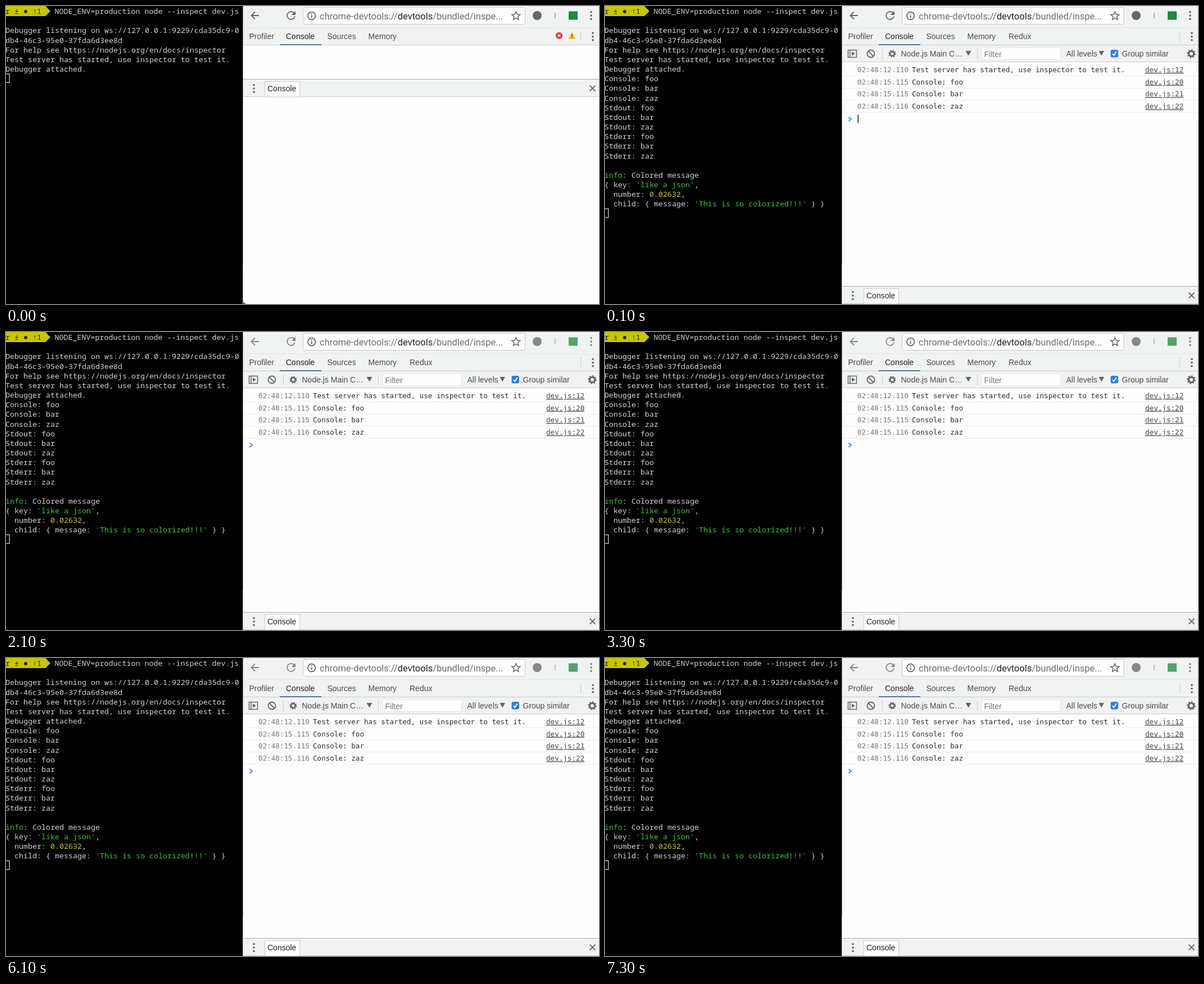
These frames come from a looping animation (1055x531 px, 8100 ms). An HTML page:

```html
<!DOCTYPE html>
<html lang="en">
<head>
<meta charset="utf-8">
<title>Node inspector console</title>
<style>
  html, body { margin: 0; width: 100%; height: 100%; overflow: hidden; background: #fdfefd; }
  svg { display: block; width: 1055px; height: 531px; }
  text { white-space: pre; }
  .term { font: 13.33px "Noto Sans Mono", "DejaVu Sans Mono", monospace; fill: #d2d2d2; }
  .ui { font: 14px "Liberation Sans", Arial, sans-serif; fill: #4a4c4b; }
  .log { font: 12.6px "DejaVu Sans Mono", monospace; fill: #2c2e2d; }
  .url { font: 16.5px Roboto, sans-serif; fill: #6c6e6d; }
  .dark { fill: #222; }
  .dim { fill: #757776; }
  .green { fill: #35c437; }
  .yellow { fill: #cbc72b; }
  .link { fill: #444; text-decoration: underline; }
  .bar { fill: #f1f3f2; }
  .rule { stroke: #c9cccb; }
  .line { fill: none; stroke: #626463; stroke-width: 1.8; }
  .blur .nav { opacity: .76; }
</style>
</head>
<body>
<svg id="stage" viewBox="0 0 1055 531">
  <defs>
    <linearGradient id="red" x1="0" y1="216" x2="0" y2="262" gradientUnits="userSpaceOnUse">
      <stop offset="0" stop-color="#ff2a1c"/>
      <stop offset=".46" stop-color="#fb1710"/>
      <stop offset=".54" stop-color="#e50a06"/>
      <stop offset="1" stop-color="#d90604"/>
    </linearGradient>
    <g id="dots" fill="#5f6160">
      <circle cy="-6.3" r="1.8"/><circle r="1.8"/><circle cy="6.3" r="1.8"/>
    </g>
    <g id="gear" fill="none">
      <circle r="4.6" stroke-width="3"/>
      <circle r="6.6" stroke-width="2.4" pathLength="16" stroke-dasharray="1"/>
    </g>
  </defs>

  <rect width="1055" height="531" fill="#fdfefd"/>

  <!-- terminal -->
  <rect width="421.5" height="531" fill="#000"/>
  <path d="M421.5 461V531" stroke="#b5b7b6"/>
  <path d="M422 524V531H429Q422 531 422 524Z" fill="#444"/>
  <path d="M0 0H70L79 9.3L70 18H0Z" fill="#c9c400"/>
  <g class="term">
    <g fill="#26260a">
      <text x="-1" y="14">r ±</text>
      <circle cx="35" cy="10" r="3"/>
      <text x="47" y="14">↑1</text>
    </g>
    <g id="intro"></g>
    <g id="output"></g>
  </g>
  <rect id="cursor" x="-2.5" width="8.6" height="15.4" fill="none" stroke="#d2d2d2" stroke-width="1.3"/>

  <!-- address bar -->
  <rect class="bar" x="422" width="633" height="69"/>
  <path d="M422 38.5H1055" stroke="#e3e6e4"/>
  <rect x="528.5" y="2.5" width="395" height="30" rx="3" fill="#fdfefd" stroke="#c5c8c6"/>
  <g class="nav">
    <path class="line" d="M450 17H437M443 10.5L436.5 17L443 23.5"/>
    <path class="line" d="M512.4 12.2A7 7 0 1 0 514 18.4"/>
    <path d="M515 9V16H508Z" fill="#626463"/>
    <circle cx="945" cy="17" r="8" fill="#666867"/>
    <rect x="1001" y="9.5" width="16" height="15" fill="#218a41"/>
    <path d="M977 12V22" stroke="#8f9190" stroke-width="1.3"/>
    <use href="#dots" x="1041" y="17"/>
  </g>
  <circle class="line" cx="543.7" cy="17.5" r="6.8" stroke-width="1.5"/>
  <path class="line" d="M543.7 16.5V21.5M543.7 13.2V15"/>
  <path class="line" style="stroke-width:1.5" d="M907.3 10L909.4 15L914.7 15.4L910.7 18.9L911.9 24.1L907.3 21.3L902.7 24.1L903.9 18.9L899.9 15.4L905.2 15Z"/>
  <text class="url" x="558" y="23.5">chrome-devtools://<tspan class="dark">devtools</tspan>/bundled/inspe...</text>

  <!-- panel tabs -->
  <g class="ui">
    <text x="432.5" y="59">Profiler</text>
    <text class="dark" x="498" y="59">Console</text>
    <text x="571.5" y="59">Sources</text>
    <text x="644.5" y="59">Memory</text>
  </g>
  <path class="rule" d="M422 69.5H1055M1022.5 45V63"/>
  <rect x="487" y="68" width="74" height="2" fill="#4f74a8"/>
  <use href="#dots" x="1044" y="54.5"/>

  <g id="alerts">
    <circle cx="984" cy="52.7" r="6" fill="#dc3535"/>
    <path d="M981.7 50.4L986.3 55M986.3 50.4L981.7 55" stroke="#fff" stroke-width="1.5"/>
    <path d="M1007 47.5L1012.5 58H1001.5Z" fill="#f2c032" stroke="#f2c032" stroke-width="1.5" stroke-linejoin="round"/>
    <path d="M1007 50.5V54.6M1007 55.8V57.2" stroke="#5f5020" stroke-width="1.4"/>
  </g>

  <!-- console panel -->
  <g id="panel">
    <text class="ui" x="718" y="59">Redux</text>
    <rect class="bar" x="422" y="70" width="633" height="29"/>
    <path class="rule" d="M422 99.5H1055M493.5 76V95M662.5 76V95"/>
    <g class="line" style="stroke-width:1.5">
      <rect x="432.5" y="78.5" width="15" height="13"/>
      <path d="M436 78.5V91.5"/>
      <path d="M439 81.5L445 85L439 88.5Z" fill="#626463" stroke="none"/>
    </g>
    <circle class="line" cx="473" cy="85" r="6.5"/>
    <path class="line" d="M468.4 80.4L477.6 89.6"/>
    <use href="#gear" transform="translate(511 85) scale(.84)" stroke="#59636c"/>
    <use href="#gear" x="1043" y="85" stroke="#626463"/>
    <rect x="670.5" y="74.5" width="140" height="21" fill="#fdfefd" stroke="#e4e7e5"/>
    <path d="M641.5 80H651.5L646.5 88.5ZM878.5 80H888L883.2 88.5Z" fill="#626463"/>
    <rect x="899.5" y="78" width="13.5" height="13.5" rx="3" fill="#2f7cf0"/>
    <path d="M902.7 85L905.3 88L909.8 81.2" fill="none" stroke="#fff" stroke-width="1.8"/>
    <g class="ui">
      <text x="526.5" y="90">Node.js Main C…</text>
      <text class="dim" x="674.5" y="90.5">Filter</text>
      <text x="820.5" y="89.5">All levels</text>
      <text x="919.5" y="89.5">Group similar</text>
    </g>
    <g class="log" id="rows"></g>
    <path d="M433.5 198L438 201.6L433.5 205.2" fill="none" stroke="#3b7de0" stroke-width="1.8"/>
    <path id="caret" d="M450.3 193.5V208.5" stroke="#111" stroke-width="1.4"/>
  </g>

  <!-- drawer -->
  <g id="drawer">
    <rect class="bar" x="422" y="131" width="633" height="31"/>
    <path d="M422 130.5H1055" stroke="#a6aba8"/>
    <path class="rule" d="M422 161.5H1055"/>
    <rect x="460.5" y="134.5" width="62" height="27.5" fill="#fdfefd" stroke="#c9cccb"/>
    <use href="#dots" x="441" y="147"/>
    <text class="ui dark" x="465" y="152">Console</text>
    <path class="line" d="M1038.5 141.7L1048.5 151.7M1048.5 141.7L1038.5 151.7"/>
  </g>

  <path id="arrow" fill="url(#red)" d="M107 242.3L453 230L441 223.5Q437.5 220 440 217Q443 214.5 448 217L485 238.2L448 260.5Q443 263.5 440 260.5Q437.5 257 441 254L455 246.8L107 244.8Q105.8 243.5 107 242.3Z"/>
</svg>
<script>
const $ = id => document.getElementById(id);
const lineY = n => 14 + n * 17.17;

// [style]text[/] marks a coloured run
const paint = s => s.replace(/\[(\w+)\]/g, '<tspan class="$1">').replace(/\[\/\]/g, '</tspan>');
const text = (x, y, s, cls = '') => `<text class="${cls}" x="${x}" y="${y}">${paint(s)}</text>`;
const block = (first, lines) => lines.map((s, i) => text(-1, lineY(first + i), s)).join('');

$('intro').innerHTML = text(86.5, lineY(0), 'NODE_ENV=production node --inspect dev.js') + block(2, [
  'Debugger listening on ws://127.0.0.1:9229/cda35dc9-0',
  'db4-46c3-95e0-37fda6d3ee8d',
  'For help see https://nodejs.org/en/docs/inspector',
  'Test server has started, use inspector to test it.',
  'Debugger attached.'
]);

const words = ['foo', 'bar', 'zaz'];
const streams = ['Console', 'Stdout', 'Stderr'].flatMap(s => words.map(w => `${s}: ${w}`));
$('output').innerHTML = block(7, [
  ...streams,
  '',
  '[green]info[/]: Colored message',
  "{ key: [green]'like a json'[/],",
  '  number: [yellow]0.02632[/],',
  "  child: { message: [green]'This is so colorized!!!'[/] } }"
]);

$('rows').innerHTML = [
  ['12.110', 'Test server has started, use inspector to test it.', 12],
  ['15.115', 'Console: foo', 20],
  ['15.115', 'Console: bar', 21],
  ['15.116', 'Console: zaz', 22]
].map(([sec, msg, line], i) => {
  const y = 118 + i * 21.7;
  return text(449, y, '02:48:' + sec, 'dim') + text(546, y, msg) + text(961, y, 'dev.js:' + line, 'link') +
    `<path d="M422 ${Math.round(y + 6) + .5}H1055" stroke="#ebedec"/>`;
}).join('');

const LOOP = 8100;
const show = (id, on) => { $(id).style.display = on ? '' : 'none'; };

function draw(t) {
  const logged = t >= 100;
  const idle = t >= 2100;
  show('alerts', !logged);
  show('output', logged);
  show('panel', logged);
  show('caret', !idle);
  show('arrow', t >= 4100 && t < 6100);
  $('stage').classList.toggle('blur', idle);
  $('cursor').setAttribute('y', lineY(logged ? 21 : 7) - 13.2);
  $('drawer').setAttribute('transform', `translate(0 ${logged ? 369 : 0})`);
}

const start = performance.now();
function tick() {
  draw((performance.now() - start) % LOOP);
  requestAnimationFrame(tick);
}
tick();
</script>
</body>
</html>
```
